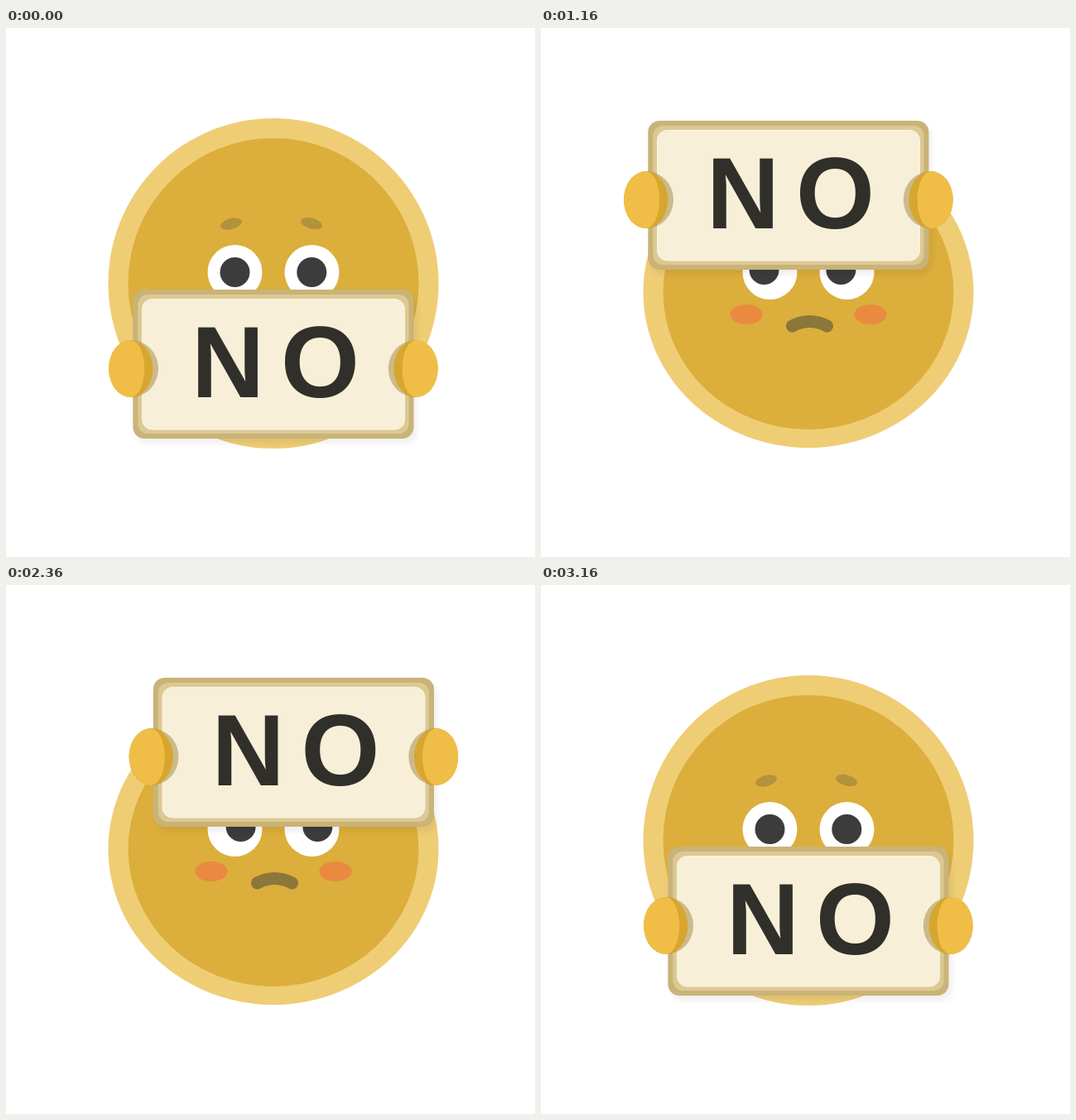
These frames come from a looping animation (639 px wide and 639 px high, 3.32 s). An HTML page:

```html
<!DOCTYPE html>
<html lang="en">
<head>
<meta charset="utf-8">
<title>No sign</title>
<style>
  html, body { margin: 0; width: 100%; height: 100%; overflow: hidden; background: #fff; }
  svg { display: block; width: 100%; height: 100%; }
  .board { filter: drop-shadow(4px 6px 3px rgba(0, 0, 0, .06)); }
  text { font: bold 122px "Liberation Sans", Arial, sans-serif; fill: #302f2a; }
</style>
</head>
<body>
<svg viewBox="0 0 639 639">
  <defs>
    <g id="hand">
      <path d="M151 377A33 34.5 0 0 1 151 446Z" fill="#967828" fill-opacity=".45"/>
      <ellipse cx="150.7" cy="411.5" rx="26.6" ry="34.5" fill="#d7a62f"/>
      <path d="M150.7 377A26.6 34.5 0 0 0 150.7 446A16.5 34.5 0 0 0 150.7 377Z" fill="#f0be46"/>
    </g>
  </defs>

  <ellipse id="rim" cx="323" rx="199.5" fill="#efcd75"/>
  <ellipse id="face" cx="323" rx="175.5" fill="#dcae3b"/>
  <g fill="#b2923c">
    <ellipse rx="13.2" ry="6.5" transform="translate(272 236.5) rotate(-15)"/>
    <ellipse rx="13.2" ry="6.5" transform="translate(369 236) rotate(15)"/>
  </g>
  <g fill="#fff">
    <circle cx="276.5" cy="295" r="33"/>
    <circle cx="369.5" cy="295" r="33"/>
  </g>
  <g id="pupils" fill="#3c3c3c">
    <circle cx="276.5" cy="295" r="18"/>
    <circle cx="369.3" cy="295" r="18"/>
  </g>
  <g fill="#e98a40">
    <ellipse cx="248" cy="346" rx="19.5" ry="12"/>
    <ellipse cx="398" cy="346" rx="19.5" ry="12"/>
  </g>
  <path d="M303.5 360Q324.5 349 345.5 360" fill="none" stroke="#8b773a" stroke-width="15" stroke-linecap="round"/>

  <g id="sign">
    <rect class="board" x="153.3" y="316" width="339.2" height="180" rx="14" fill="#cab378"/>
    <rect x="159.3" y="322" width="327.2" height="168" rx="12" fill="#dcc992"/>
    <rect x="164.5" y="327.5" width="317" height="157.5" rx="12" fill="#f8efd9" stroke="#faf3e3"/>
    <text x="224 332" y="446">NO</text>
    <use href="#hand"/>
    <use href="#hand" transform="translate(645.8) scale(-1 1)"/>
  </g>
</svg>
<script>
  const LOOP = 3320, STEP = 40, LIFT = 204, SWAY = 25.5;
  const $ = id => document.getElementById(id);

  // Smooth 0 to 1 between two times
  const ease = (t, from, to) => {
    const s = Math.min(1, Math.max(0, (t - from) / (to - from)));
    return s * s * (3 - 2 * s);
  };
  const move = (id, x, y) => $(id).setAttribute('transform', `translate(${x} ${y})`);
  const squash = (id, cy, ry) => {
    $(id).setAttribute('cy', cy);
    $(id).setAttribute('ry', ry);
  };

  function draw(time) {
    const t = Math.floor(time % LOOP / STEP) * STEP;
    const up = ease(t, 367, 733) - ease(t, 2800, 3160);
    const x = SWAY * (2 * ease(t, 1400, 2067) - ease(t, 733, 1233) - ease(t, 2300, 2800));
    move('sign', x, -LIFT * up);
    move('pupils', x * .29, -3 * up);
    squash('rim', 308.5 + 10.5 * up, 199.5 - 11.5 * up);
    squash('face', 308.5 + 10.5 * up, 175.5 - 9.5 * up);
  }

  const start = performance.now();
  function tick() {
    draw(performance.now() - start);
    requestAnimationFrame(tick);
  }
  tick();
</script>
</body>
</html>
```
